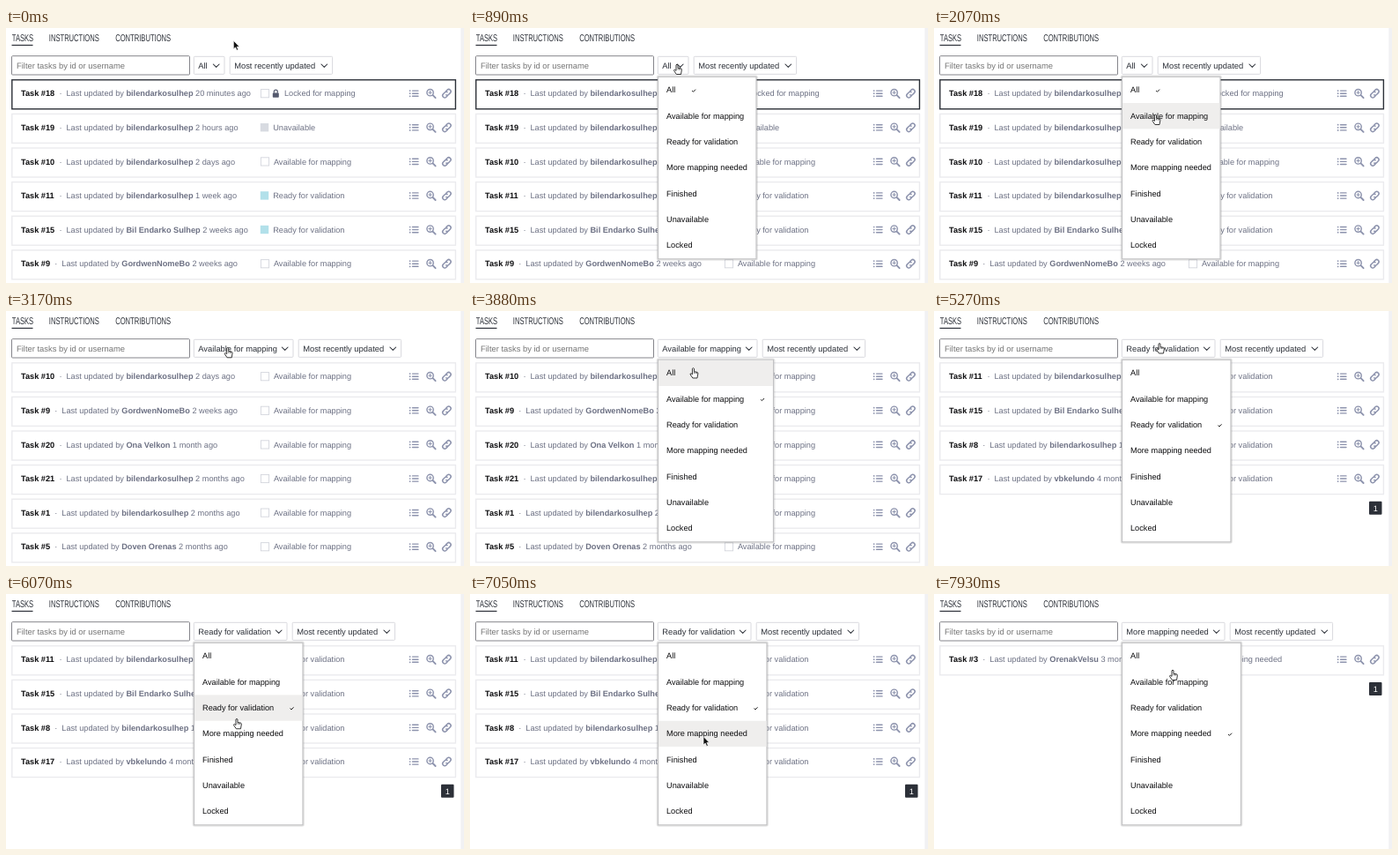
Write an HTML page that moves like this. It is 520x289 px and loops after 8000 ms.

```html
<!DOCTYPE html>
<html lang="en">
<head>
<meta charset="utf-8">
<title>Task filter</title>
<style>
  html, body { margin: 0; height: 100%; overflow: hidden; background: #fff; }
  svg { display: block; width: 100vw; height: 100vh; }
  text { font: 9.2px "Liberation Sans", Arial, sans-serif; fill: #0c0c0e; text-rendering: geometricPrecision; }
  .tab { font-size: 11.2px; fill: #2c3038; }
  .muted { fill: #6c7083; }
  .bold { font-weight: 700; }
  .hint { font-size: 9.4px; fill: #757575; }
  .button { font-size: 9.35px; fill: #2c3038; }
  .line { fill: none; stroke-linecap: round; stroke-linejoin: round; }
</style>
</head>
<body>
<svg viewBox="0 0 520 289" xmlns="http://www.w3.org/2000/svg">
  <defs>
    <g id="icons" class="line" stroke="#8d93ad" stroke-width="1.4">
      <path d="M461.5-3.1H468M461.5 0H468M461.5 3.1H468"/>
      <path d="M458.6-3.1h.1M458.6 0h.1M458.6 3.1h.1" stroke-width="1.7"/>
      <circle cx="481.6" cy="-1" r="3.7"/>
      <path d="M484.6 2l3 3" stroke-width="1.9"/>
      <path d="M479.9-1h3.4M481.6-2.7v3.4" stroke-width="1"/>
      <g transform="translate(500.4 0) rotate(-45)" stroke-width="1.5">
        <path d="M1.2-2.4H3.2a2.4 2.4 0 0 1 0 4.8H.6a2.4 2.4 0 0 1-2.2-1.7"/>
        <path d="M-1.2 2.4H-3.2a2.4 2.4 0 0 1 0-4.8H-.6a2.4 2.4 0 0 1 2.2 1.7"/>
      </g>
    </g>
    <g id="lock">
      <rect x="302.8" y="-.6" width="7" height="5.2" rx=".8" fill="#555a6e"/>
      <path d="M304.3-.5V-2a2 2 0 0 1 4 0v1.5" fill="none" stroke="#555a6e" stroke-width="1.2"/>
    </g>
  </defs>
  <rect width="520" height="289" fill="#fff"/>
  <rect x="516.3" width="3.7" height="289" fill="#f1f1f3"/>
  <g id="tabs"></g>
  <path d="M6.5 19.5H30.5" stroke="#2c3038" stroke-width="1.2"/>
  <rect x="6.5" y="31.7" width="202" height="21.3" rx="1" fill="#fff" stroke="#85858b"/>
  <text class="hint" x="12" y="45.6">Filter tasks by id or username</text>
  <g id="page"></g>
  <g id="menu">
    <g id="panel"></g>
    <rect id="hover" x="214" height="29.3" fill="#efeeed"/>
    <g id="items"></g>
  </g>
  <g id="cursor">
    <path id="arrow" d="M0 0V9.6L2.2 7.6 3.7 11 5.4 10.3 3.9 7H6.8Z" fill="#111" stroke="#fff" stroke-width=".7"/>
    <path id="hand" d="M-1 .8Q0-.5 1 .8V4.2L4.6 4.9Q5.5 5.2 5.4 6.4L4.5 11.5H-.6L-3.4 7.4Q-3.6 6.2-2.4 6.3L-1 7.4Z" fill="#fff" stroke="#222" stroke-width=".9" stroke-linejoin="round"/>
    <path id="fingers" d="M1 4.4V6.4M2.6 4.8V6.6M4 5V6.6" stroke="#222" stroke-width=".6"/>
  </g>
</svg>
<script>
const LOOP = 8000, PITCH = 38.6, ROW = 29.35, MENU_TOP = 55.7;
const $ = id => document.getElementById(id);

const OPTIONS = ['All', 'Available for mapping', 'Ready for validation', 'More mapping needed', 'Finished', 'Unavailable', 'Locked'];
const MAIN = 'bilendarkosulhep', FULL = 'Bil Endarko Sulhep', SECOND = 'GordwenNomeBo';
const FILLS = { 'Unavailable': '#d8dbe1', 'Ready for validation': '#b2e0ea', 'More mapping needed': '#fceca4' };
const [, FREE, READY, MORE] = OPTIONS;

// Each view: edges of the button and menu, check mark position, tasks.
const VIEWS = [
  { button: 248, menu: 325, check: 254, tasks: [
    [18, MAIN, '20 minutes', 'Locked for mapping'], [19, MAIN, '2 hours', 'Unavailable'],
    [10, MAIN, '2 days', FREE], [11, MAIN, '1 week', READY],
    [15, FULL, '2 weeks', READY], [9, SECOND, '2 weeks', FREE]] },
  { button: 326, menu: 344.5, check: 332, tasks: [
    [10, MAIN, '2 days', FREE], [9, SECOND, '2 weeks', FREE],
    [20, 'Ona Velkon', '1 month', FREE], [21, MAIN, '2 months', FREE],
    [1, MAIN, '2 months', FREE], [5, 'Doven Orenas', '2 months', FREE]] },
  { button: 319, menu: 337, check: 324.5, tasks: [
    [11, MAIN, '1 week', READY], [15, FULL, '2 weeks', READY],
    [8, MAIN, '1 month', READY], [17, 'vbkelundo', '4 months', READY]] },
  { button: 330, menu: 348.5, check: 336, tasks: [[3, 'OrenakVelsu', '3 months', MORE]] }
];

// [start, view, menu open]
const SCENES = [[0, 0, 0], [890, 0, 1], [2270, 1, 0], [3490, 1, 1], [4570, 2, 0], [5230, 2, 1], [7090, 3, 0], [7620, 3, 1]];
// [start, end, x, y]
const MOVES = [
  [490, 710, 235, 41], [1380, 2070, 251.5, 98], [2650, 3170, 251.7, 41.3], [3640, 4350, 258.3, 128],
  [4720, 5150, 256, 36.5], [5320, 6110, 262, 142], [6180, 6390, 265, 161.5],
  [7220, 7520, 268, 42], [7660, 7790, 270, 66], [7860, 7930, 271, 86]
];
const ARROW_TIMES = [[0, 620], [4520, 5040], [7050, 7460]];

const text = (cls, x, y, s) => `<text class="${cls}" x="${x}" y="${y}">${s}</text>`;

function dropdown(left, right, label) {
  return `<rect x="${left}" y="32.3" width="${right - left}" height="20" rx="1" fill="#fff" stroke="#d9d9de"/>` +
    text('button', left + 5, 45.6, label) +
    `<path class="line" d="M${right - 12.7} 41l3.4 3.4 3.4-3.4" stroke="#2c3038" stroke-width="1.05"/>`;
}

function swatch(fill) {
  return fill ? `<rect x="288.8" y="-4.8" width="9.4" height="9.4" fill="${fill}"/>`
    : '<rect x="289.4" y="-4.6" width="9.2" height="9.2" fill="#fff" stroke="#d3d5dc" stroke-width=".9"/>';
}

function card([id, name, age, status], i) {
  const x = id > 9 ? 68.5 : 63.3;
  const locked = status.startsWith('Locked');
  const fill = FILLS[status];
  const statusX = locked ? 316 : fill ? 303.2 : 303.9;
  return `<g transform="translate(0 ${74.2 + PITCH * i})">
    <rect x="6.8" y="-15.4" width="503.6" height="33" fill="#fff" stroke="${locked ? '#2c3038' : '#ebebee'}" stroke-width="1.4"/>
    ${text('bold', 17, 3.1, 'Task #' + id)}${text('muted', x - 8, 3.1, '·')}
    ${text('muted', x, 3.1, `Last updated by <tspan class="bold">${name}</tspan> ${age} ago`)}
    ${swatch(fill)}${locked ? '<use href="#lock"/>' : ''}${text('muted', statusX, 3.1, status)}
    <use href="#icons"/></g>`;
}

function pager(count) {
  const y = 61.3 + PITCH * count;
  return `<rect x="494" y="${y}" width="14.5" height="15" rx="1" fill="#2c3038"/>
    <text x="501.2" y="${y + 10.8}" text-anchor="middle" style="fill:#fff">1</text>`;
}

function showScene(index, open) {
  const { button, menu, check, tasks } = VIEWS[index];
  $('page').innerHTML = dropdown(213.3, button, OPTIONS[index]) +
    dropdown(button + 6.2, button + 122.6, 'Most recently updated') +
    tasks.map(card).join('') + (tasks.length < 6 ? pager(tasks.length) : '');
  $('menu').style.display = open ? '' : 'none';
  const box = `x="213.5" y="55.3" width="${menu - 213.5}" height="206.5"`;
  $('panel').innerHTML = `<rect ${box} fill="none" stroke="#000" stroke-opacity=".09" stroke-width="4" rx="1"/>
    <rect ${box} fill="#fff" stroke="#c2c2c4" stroke-width="1.2"/>`;
  $('hover').setAttribute('width', menu - 214.5);
  $('items').innerHTML = OPTIONS.map((s, i) => text('', 223, 73.3 + ROW * i, s)).join('') +
    `<path class="line" d="M${check - 1.7} ${71.2 + ROW * index}l1.2 1.1 2.3-2.4" stroke="#222"/>`;
}

function cursorAt(t) {
  let x = 258.3, y = 14.3;
  for (const [start, end, toX, toY] of MOVES) {
    if (t <= start) break;
    const p = Math.min(1, (t - start) / (end - start));
    const k = p * p * (3 - 2 * p);
    x += (toX - x) * k;
    y += (toY - y) * k;
  }
  return [x, y];
}

let shown = null;
function render(t) {
  const scene = SCENES.filter(s => s[0] <= t).pop();
  if (scene !== shown) {
    shown = scene;
    showScene(scene[1], scene[2]);
  }
  const [x, y] = cursorAt(t);
  const arrow = ARROW_TIMES.some(([a, b]) => t >= a && t < b);
  $('cursor').setAttribute('transform', `translate(${x} ${y})`);
  $('arrow').style.display = arrow ? '' : 'none';
  $('hand').style.display = $('fingers').style.display = arrow ? 'none' : '';

  const row = Math.floor((y - MENU_TOP) / ROW);
  $('hover').style.display = row >= 0 && scene[1] < 3 ? '' : 'none';
  $('hover').setAttribute('y', MENU_TOP + ROW * row);
}

// All tabs share one condensed face.
$('tabs').innerHTML = [['TASKS', 6.8], ['INSTRUCTIONS', 48.8], ['CONTRIBUTIONS', 124.2]]
  .map(([s, x]) => `<g transform="translate(${x} 15.2) scale(.68 1)">${text('tab', 0, 0, s)}</g>`).join('');

const began = performance.now();
function tick() {
  render((performance.now() - began) % LOOP);
  requestAnimationFrame(tick);
}
tick();
</script>
</body>
</html>
```
